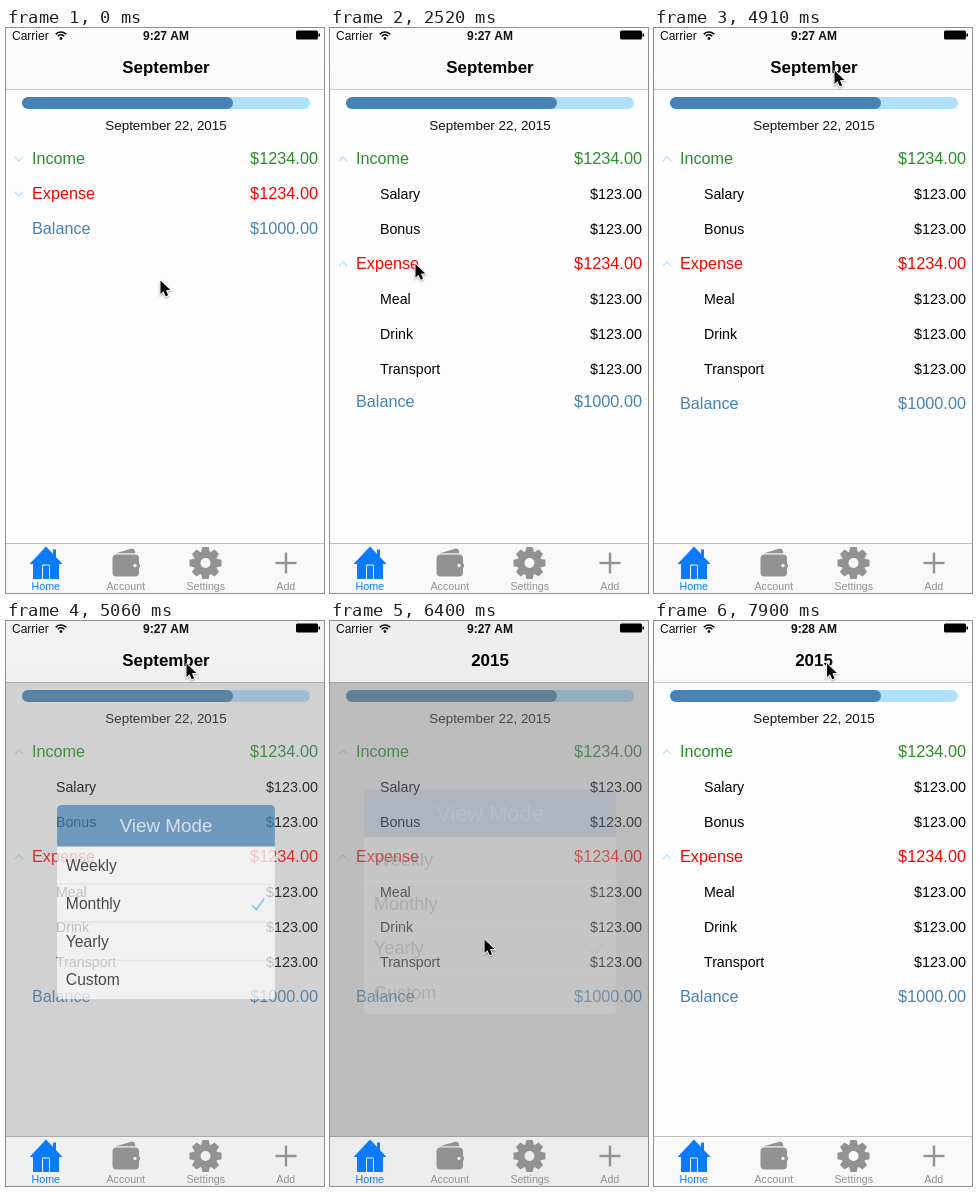
Write an HTML page with a canvas that moves like this. It is 318 px wide and 565 px high and loops after 8 s.

```html
<!DOCTYPE html>
<html lang="en">
<head>
<meta charset="utf-8">
<title>Budget app</title>
<style>
html, body { margin: 0; width: 100%; height: 100%; overflow: hidden; background: #fdfdfd; }
canvas { display: block; width: 318px; height: 565px; }
</style>
</head>
<body>
<canvas></canvas>
<script>
const W = 318, H = 565, LOOP = 8000, TICK = 149;
const BLUE = '#4682b4', SKY = '#aee0ff', GREEN = '#2a8c2a', RED = '#ff0000', GRAY = '#929292', TINT = '#0a7aff';
const canvas = document.querySelector('canvas'), g = canvas.getContext('2d');
const ratio = window.devicePixelRatio || 1;
canvas.width = W * ratio;
canvas.height = H * ratio;

// Ease-out from 0 to 1 between two ticks
function ease(tick, from, to, power = 3) {
  const p = Math.min(1, Math.max(0, (tick - from) / (to - from)));
  return 1 - (1 - p) ** power;
}

// Pointer moves: start tick, end tick, destination
const moves = [
  [1, 5, 11, 142], [9, 11, 38.5, 228.5], [11, 14, 85.5, 236],
  [28, 33, 180.5, 42.5], [36, 40, 154.5, 318.5], [47, 51, 192, 90], [51, 53, 173, 42.5]
];

function pointerAt(tick) {
  let x = 154.5, y = 252.5;
  for (const [from, to, toX, toY] of moves) {
    const p = ease(tick, from, to, 2.3);
    x += (toX - x) * p;
    y += (toY - y) * p;
  }
  return [x, y];
}

function text(str, x, y, size, color, align = 'left', weight = '') {
  g.font = `${weight} ${size}px "Liberation Sans", Arial, sans-serif`;
  g.textAlign = align;
  g.fillStyle = color;
  g.fillText(str, x, y);
}

function rect(x, y, w, h, color, radius = 0) {
  g.fillStyle = color;
  g.beginPath();
  g.roundRect(x, y, w, h, radius);
  g.fill();
}

function trace(points) {
  g.beginPath();
  points.forEach(p => g.lineTo(...p));
}

function line(points, color, width) {
  trace(points);
  g.strokeStyle = color;
  g.lineWidth = width;
  g.stroke();
}

function shape(points, color) {
  trace(points);
  g.fillStyle = color;
  g.fill();
}

function disc(x, y, r, color) {
  g.beginPath();
  g.arc(x, y, r, 0, 7);
  g.fillStyle = color;
  g.fill();
}

function group(label, amount, color, y) {
  text(label, 26, y, 16.2, color);
  text(amount, 312, y, 16.3, color, 'right');
}

function chevron(y, open) {
  const tip = 2.2 - 4.4 * open;
  line([[9, y - tip], [13, y + tip], [17, y - tip]], SKY, 1.2);
}

function children(labels, y, open) {
  g.globalAlpha = open;
  labels.forEach((label, i) => {
    const rowY = y + 35 * (i + 1);
    text(label, 50, rowY, 14.2, '#000');
    text('$123.00', 312, rowY, 14.4, '#000', 'right');
  });
  g.globalAlpha = 1;
}

function content(income, expense) {
  rect(16, 69, 288, 12, SKY, 6);
  rect(16, 69, 211, 12, BLUE, 6);
  text('September 22, 2015', 160, 101.5, 13.4, '#111', 'center');
  const incomeY = 136, expenseY = incomeY + 35 + 70 * income, balanceY = expenseY + 35 + 105 * expense;
  children(['Salary', 'Bonus'], incomeY, income);
  children(['Meal', 'Drink', 'Transport'], expenseY, expense);
  group('Income', '$1234.00', GREEN, incomeY);
  group('Expense', '$1234.00', RED, expenseY);
  group('Balance', '$1000.00', BLUE, balanceY);
  chevron(incomeY - 5, income);
  chevron(expenseY - 5, expense);
}

function shade(light, dark, p) {
  const v = Math.round(light + (dark - light) * p);
  return `rgb(${v},${v},${v})`;
}

function navBar(dim, title, clock) {
  const fill = g.createLinearGradient(0, 34, 0, 61);
  fill.addColorStop(0, shade(252, 238, dim));
  fill.addColorStop(1, shade(247, 235, dim));
  rect(0, 0, W, 61, fill);
  rect(0, 61, W, 1, shade(200, 165, dim));
  text('Carrier', 6, 11.5, 12, '#111');
  disc(55, 10.5, 1.4, '#111');
  for (const r of [4.2, 7]) {
    g.beginPath();
    g.arc(55, 11, r, -Math.PI * .77, -Math.PI * .23);
    g.strokeStyle = '#111';
    g.lineWidth = 1.6;
    g.stroke();
  }
  text(clock, 160, 11.5, 12, '#111', 'center', 'bold');
  rect(290, 2.5, 22, 9, '#000', 1.5);
  rect(312.5, 5.5, 1.5, 3, '#000');
  text(title, 160, 45, 16.9, '#000', 'center', 'bold');
}

function house(hole) {
  shape([[23.5, 536], [40, 518.5], [56.5, 536]], TINT);
  rect(47, 521.5, 3, 9, TINT);
  rect(27, 534, 26, 17, TINT);
  line([[36.5, 551], [36.5, 537], [43.5, 537], [43.5, 551]], hole, 1);
}

function wallet(hole) {
  shape([[109, 525.5], [126, 520.5], [128.5, 521.5], [129.5, 525.5]], GRAY);
  line([[110, 526], [131, 526]], hole, .8);
  rect(106.5, 526.5, 26.5, 22, GRAY, 4);
  rect(126, 535, 8, 5, GRAY, 2);
  disc(129, 537.5, 1.7, hole);
}

function gear(x, y, hole) {
  disc(x, y, 12, GRAY);
  g.save();
  g.translate(x, y);
  for (let i = 0; i < 8; i++) {
    shape([[-4.5, -10], [-3.2, -16], [3.2, -16], [4.5, -10]], GRAY);
    g.rotate(Math.PI / 4);
  }
  g.restore();
  disc(x, y, 5, hole);
}

function tabBar(dim) {
  const fill = shade(248, 236, dim);
  rect(0, 515, W, 50, fill);
  rect(0, 515, W, 1, shade(190, 160, dim));
  house(fill);
  wallet(fill);
  gear(199.5, 535, fill);
  rect(269.5, 533.8, 21, 2.4, GRAY);
  rect(278.8, 524.5, 2.4, 21, GRAY);
  ['Home', 'Account', 'Settings', 'Add'].forEach((label, i) =>
    text(label, 39.8 + 80 * i, 561.5, 10.7, i ? GRAY : TINT, 'center'));
}

function popup(shown, checked) {
  const scale = 1.3 - .3 * shown;
  g.save();
  g.globalAlpha = shown;
  g.translate(160, 281);
  g.scale(scale, scale);
  g.translate(-160, -281);
  rect(60, 230, 200, 140, '#fff', [0, 0, 4, 4]);
  rect(60, 192, 200, 38, BLUE, [4, 4, 0, 0]);
  text('View Mode', 160, 217, 17.3, '#fff', 'center');
  ['Weekly', 'Monthly', 'Yearly', 'Custom'].forEach((label, i) => {
    const y = 230 + 35 * i;
    text(label, 68, y + 22.5, 14.4, '#000');
    if (i) rect(60, y - 1, 200, 1, '#dcdcdc');
    if (i === checked) line([[239, y + 19], [243, y + 23], [250, y + 13]], '#42aaf0', 1.3);
  });
  g.restore();
}

function arrow(x, y) {
  g.save();
  g.translate(x, y);
  g.shadowColor = 'rgba(0,0,0,.35)';
  g.shadowBlur = 2 * ratio;
  g.shadowOffsetY = ratio;
  const outline = [[0, 0], [0, 13.5], [3, 10.7], [5.2, 15.8], [7.6, 14.8], [5.4, 9.8], [9.8, 9.6]];
  line([...outline, [0, 0]], '#fff', 1.8);
  g.shadowColor = 'transparent';
  shape(outline, '#000');
  g.restore();
}

function draw(now) {
  const tick = Math.floor((now % LOOP + 20) / TICK);
  const income = ease(tick, 6, 9);
  const expense = ease(tick, 14, 18) - ease(tick, 20, 23) + ease(tick, 24, 28);
  const appear = ease(tick, 33, 36);
  const dim = tick < 44 ? appear : 0;

  g.setTransform(ratio, 0, 0, ratio, 0, 0);
  rect(0, 0, W, H, '#fdfdfd');
  content(income, expense);
  rect(0, 61, W, 455, `rgba(127,127,127,${dim / 2})`);
  navBar(dim, tick < 43 ? 'September' : '2015', tick < 44 ? '9:27 AM' : '9:28 AM');
  tabBar(dim);
  popup(appear - ease(tick, 42, 44), tick < 42 ? 1 : 2);
  arrow(...pointerAt(tick));
}

let start;
function frame(now) {
  start ??= now;
  draw(now - start);
  requestAnimationFrame(frame);
}
requestAnimationFrame(frame);
</script>
</body>
</html>
```
